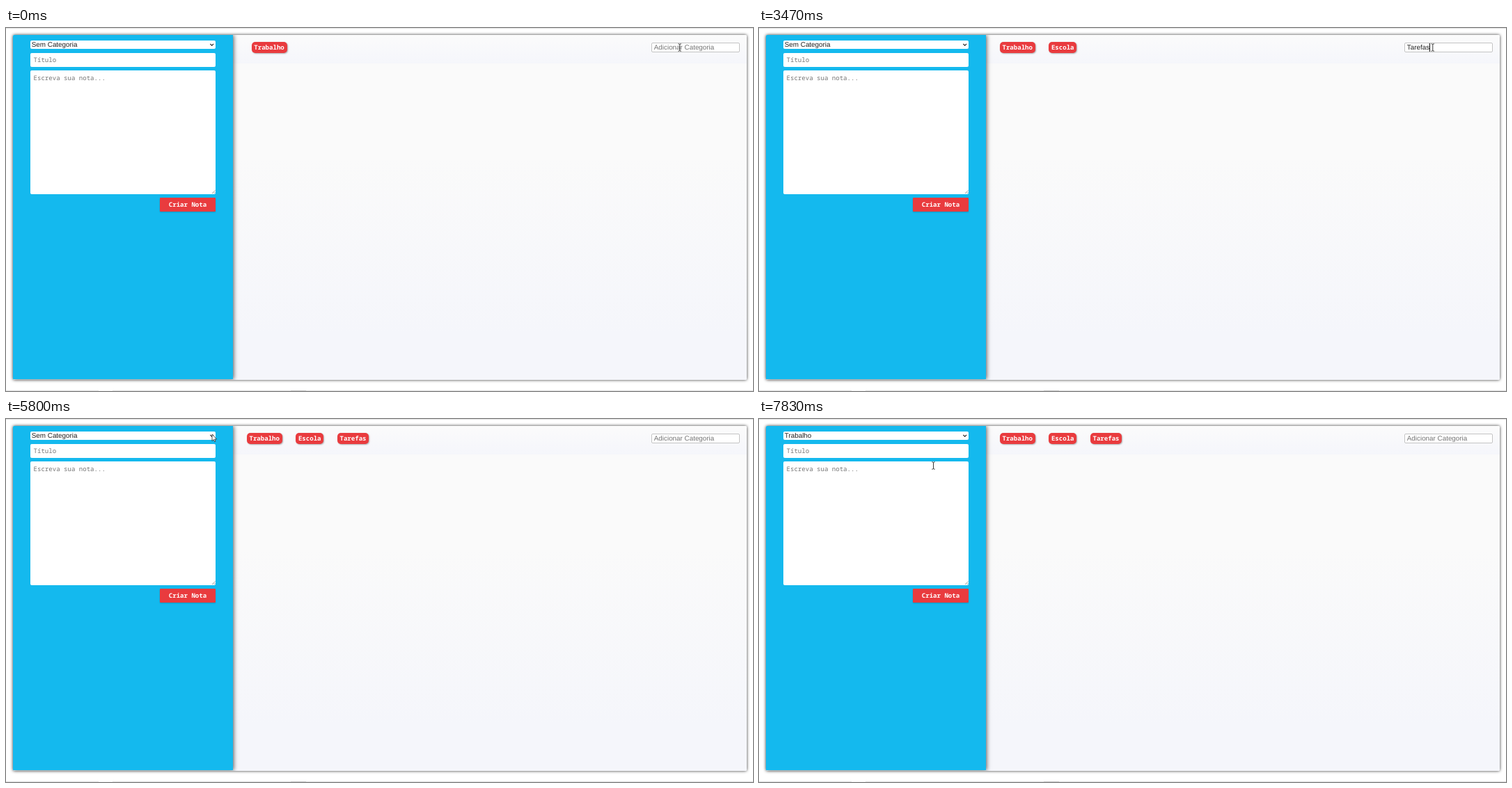
Write an HTML page that moves like this. It is 1073 px wide and 522 px high and loops after 8000 ms.

```html
<!DOCTYPE html>
<html lang="pt">
<head>
<meta charset="utf-8">
<title>Notas</title>
<style>
  html, body { margin: 0; width: 100%; height: 100%; overflow: hidden; background: #fff; }
  body { position: relative; text-rendering: geometricPrecision;
    font: 9.85px "Liberation Sans", Arial, sans-serif; color: #222; }
  div, svg { position: absolute; box-sizing: border-box; white-space: pre; }
  .rule { left: 0; width: 1073px; height: 1px; background: #e2e2e2; }
  .app { left: 10px; top: 10px; width: 1054px; height: 496px; border-radius: 2px;
    background: #fff; box-shadow: 0 0 4px #333; }
  .clip { inset: 0; overflow: hidden; border-radius: 2px; }
  .head { left: 316px; top: 0; right: 0; height: 41px; background: linear-gradient(#fbfbfb, #f5f6fb); }
  .list { left: 316px; top: 41px; right: 0; bottom: 0; background: linear-gradient(#fafafa 30%, #f5f6fb 85%); }
  .side { left: 0; top: 0; width: 316px; height: 495px; background: #14b9ee; box-shadow: 1px 0 6px rgba(0,0,0,.65); }
  .box { left: 35px; width: 266px; background: #fff; border-radius: 2px; }
  .mono { font: 9.07px "Noto Sans Mono", "DejaVu Sans Mono", monospace; color: #757575; padding-left: 4.5px; }
  .bold { font-weight: 700; color: #fff; background: #e93b3e; padding: 0; text-align: center; }
  .tag { top: 20px; height: 16px; line-height: 15px; padding: 0 3.7px; border-radius: 5px;
    box-shadow: 1px 1px 2px rgba(0,0,0,.3); }
  .field { left: 927px; top: 21px; width: 127px; height: 14px; line-height: 13px;
    background: #fff; border: 1px solid #c4c4c4; border-radius: 2px; }
  .field div { left: 2.8px; top: 0; height: 12px; }
  #hint { color: #757575; }
  #typed { border-right: 1px solid transparent; }
  #menu { left: 35px; top: 30px; width: 266px; height: 79px; background: #fff; border: 1px solid #888;
    font-size: 10px; box-shadow: 1px 2px 3px rgba(0,0,0,.4); }
  #menu div { left: 0; width: 100%; height: 19.5px; line-height: 20px; padding-left: 2px; }
  #menu .on { background: #1e90ff; color: #fff; }
  svg { left: 0; top: 0; overflow: visible; fill: none; }
</style>
</head>
<body>
<div class="rule" style="top:0"></div>
<div class="rule" style="top:521px"></div>
<div class="rule" style="top:521px;left:133px;width:20px;background:#f8f8f8"></div>
<div class="rule" style="top:521px;left:409px;width:22px;background:#c9c9c9"></div>

<div class="app"><div class="clip">
  <div class="head"></div>
  <div class="list"></div>
  <div class="side"></div>
</div></div>

<div id="tags"></div>
<div class="field"><div id="hint">Adicionar Categoria</div><div id="typed"></div></div>

<div class="box" id="select" style="top:18px;height:12px;line-height:13px;padding-left:1.8px"></div>
<svg width="1" height="1"><path d="M293.3 22.8l2.4 2.4 2.4-2.4" stroke="#222" stroke-width="1.2"/></svg>
<div class="box mono" style="top:35.5px;height:20.5px;line-height:20.5px">Título</div>
<div class="box mono" style="top:61px;height:178px;line-height:21.5px">Escreva sua nota...</div>
<svg width="1" height="1"><path d="M296 238l4.5-4.5M298.5 238l2-2" stroke="#777" stroke-width=".7"/></svg>
<div class="mono bold" style="left:221px;top:244px;width:80px;height:20px;line-height:20.5px;border-radius:1px;box-shadow:0 1px 2px rgba(0,0,0,.2)">Criar Nota</div>

<div id="menu"></div>
<svg width="1" height="1">
  <path id="arrow" d="M0 0V9.6L2.2 7.6L3.6 10.7L5 10.1L3.6 7H6.6Z" fill="#fff" stroke="#222" stroke-width=".75"/>
  <path id="beam" d="M-2.2 -5.2Q0 -5.2 0 -4.4Q0 -5.2 2.2 -5.2M0 -4.6V4.6M-2.2 5.2Q0 5.2 0 4.4Q0 5.2 2.2 5.2" stroke="#222" stroke-width=".9"/>
</svg>

<script>
const LOOP = 8000, SLIDE = 500, SHIFT = 39, ROW = 19.5, HOVER_LAG = 40;
const MENU_OPEN = 5870, PICK = 7830;
const $ = id => document.getElementById(id);

// name, resting x, start of the slide
const TAGS = [['Trabalho', 345.8, -290], ['Escola', 416.2, 1270], ['Tarefas', 475.8, 3830]];

// word, time of each key, time of Enter
const WORDS = [
  ['Escola', [230, 430, 630, 730, 900, 1000], 1270],
  ['Tarefas', [2670, 2900, 3100, 3200, 3270, 3370, 3470], 3830]
];

// caret turns on and off in turn
const BLINKS = [230, 1530, 2070, 2600, 2670, 4000, 4530, 5060, 5590, 5800];

// time, x, y, eased arrival
const PATH = [
  [0, 967.8, 28], [4150, 967.8, 28], [4630, 390, 97, true], [4930, 390, 97],
  [5430, 296, 22, true], [6200, 296, 22], [6670, 249, 73], [6830, 250, 79],
  [6970, 250, 79], [7430, 250.5, 67, true], [LOOP, 250.5, 67]
];

function add(parent, className, text) {
  const el = document.createElement('div');
  el.className = className;
  el.textContent = text;
  return parent.appendChild(el);
}

const tags = TAGS.map(([name]) => add($('tags'), 'mono bold tag', name));
const rows = ['Sem Categoria', ...TAGS.map(tag => tag[0])].map((name, i) => {
  const row = add($('menu'), '', name);
  row.style.top = i * ROW - 0.5 + 'px';
  return row;
});

function pointer(t) {
  const i = Math.max(1, PATH.findIndex(p => p[0] > t));
  const [t0, x0, y0] = PATH[i - 1], [t1, x1, y1, eased] = PATH[i];
  let k = (t - t0) / (t1 - t0);
  if (eased) k = k * k * (3 - 2 * k);
  return [x0 + (x1 - x0) * k, y0 + (y1 - y0) * k];
}

function typedAt(t) {
  const word = WORDS.find(([, keys, enter]) => t >= keys[0] && t < enter);
  return word ? word[0].slice(0, word[1].filter(k => k <= t).length) : '';
}

function render(t) {
  tags.forEach((el, i) => {
    const [, x, start] = TAGS[i];
    const left = 1 - Math.min(1, Math.max(0, (t - start) / SLIDE));
    el.style.display = t < start ? 'none' : '';
    el.style.left = x + SHIFT * left * left + 'px';
  });

  const text = typedAt(t);
  const caret = BLINKS.filter(b => b <= t).length % 2;
  $('typed').textContent = text;
  $('typed').style.borderColor = caret ? '#111' : 'transparent';
  $('hint').style.display = text ? 'none' : '';

  const open = t >= MENU_OPEN && t < PICK;
  $('menu').style.display = open ? '' : 'none';
  $('select').textContent = t < PICK ? 'Sem Categoria' : 'Trabalho';
  const hover = Math.max(0, Math.floor((pointer(Math.max(0, t - HOVER_LAG))[1] - 31) / ROW));
  rows.forEach((row, i) => row.classList.toggle('on', i === hover));

  const [x, y] = pointer(t);
  const overField = x > 927 && y < 35;
  const overNote = x < 301 && y > 61 && !open;
  const isBeam = overField || overNote;
  for (const id of ['arrow', 'beam']) {
    $(id).setAttribute('transform', `translate(${x} ${y})`);
    $(id).style.display = (id === 'beam') === isBeam ? '' : 'none';
  }
}

const begin = performance.now();
function tick() {
  render((performance.now() - begin) % LOOP);
  requestAnimationFrame(tick);
}
render(0);
requestAnimationFrame(tick);
</script>
</body>
</html>
```
